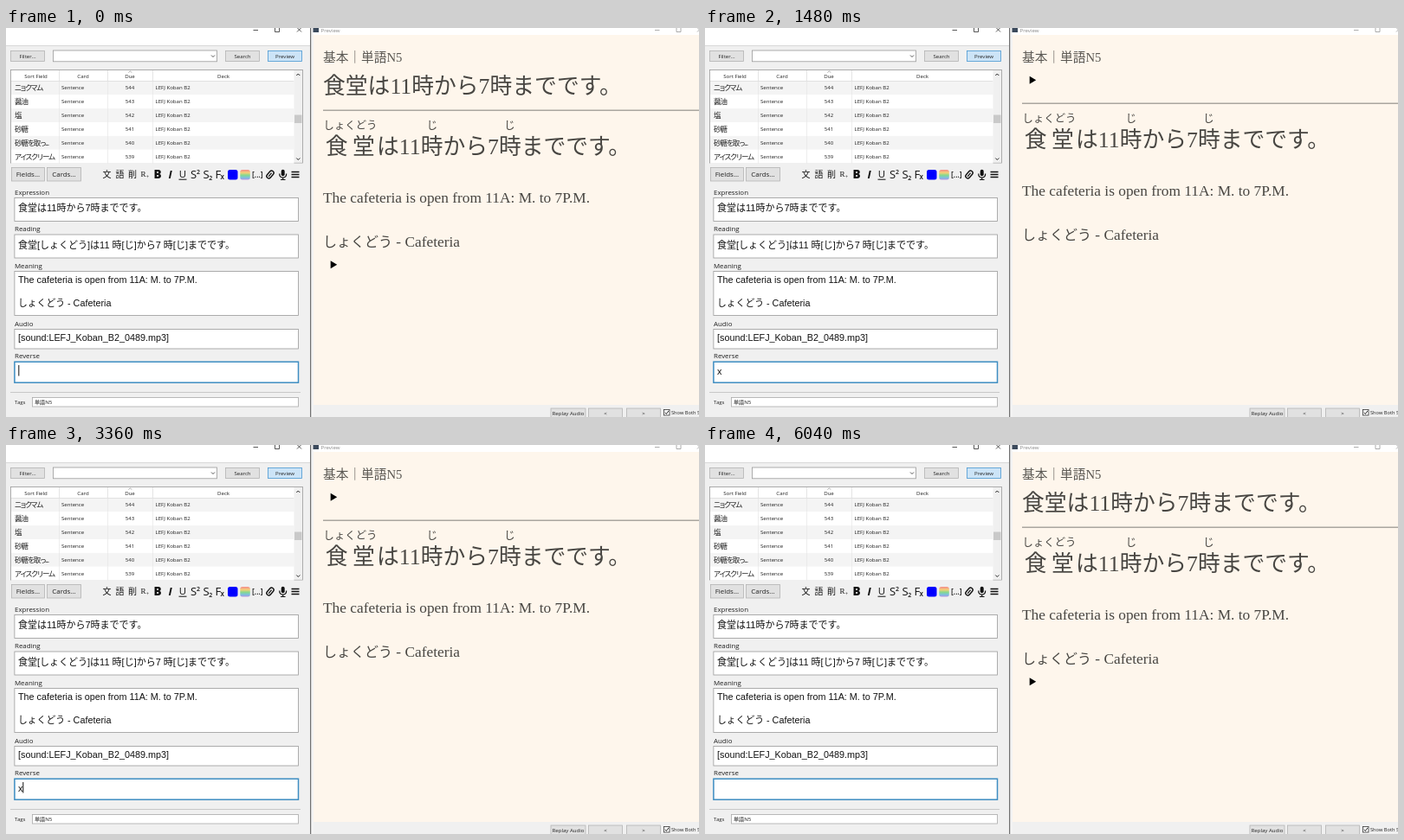
An HTML page for the animation above (6.08 s loop, 800x450 px).

```html
<!DOCTYPE html>
<html lang="ja">
<head>
<meta charset="utf-8">
<style>
  html, body { margin: 0; width: 100%; height: 100%; overflow: hidden; background: #f0f0f0; }
  svg { display: block; width: 800px; height: 450px; white-space: pre; }
  .ui { font: 6.1px "Open Sans", "Noto Sans CJK JP", "Noto Sans CJK", sans-serif; fill: #222; }
  .mid { text-anchor: middle; }
  .big { font-size: 7.9px; }
  .kana { font: 500 8.5px "Noto Sans CJK JP", "Noto Sans CJK", sans-serif; font-feature-settings: "palt"; letter-spacing: -1px; }
  .edit { font: 10.8px "Liberation Sans", "Noto Sans CJK JP", "Noto Sans CJK", sans-serif; fill: #111; }
  .edit .jp { font-size: 11px; }
  .tool { font: 10px "Noto Sans CJK JP", "Noto Sans CJK", sans-serif; text-anchor: middle; fill: #111; }
  .tool .lat { font-family: "Open Sans", sans-serif; font-size: 13px; font-weight: 600; }
  .card { font: 300 17.35px "Liberation Serif", "Noto Sans CJK JP", "Noto Sans CJK", serif; fill: #484642; }
  .head { font-size: 25.8px; }
  .ruby { font-size: 12.4px; }
  .line { fill: none; stroke: #111; }
  .btn { fill: #e1e1e1; stroke: #b4b4b4; stroke-width: .8; }
  .box { fill: #fff; stroke: #999; stroke-width: .8; }
</style>
</head>
<body>
<svg viewBox="0 0 800 450">
  <defs>
    <linearGradient id="rainbow" x2="0" y2="1">
      <stop stop-color="#f58a8a"/><stop offset=".3" stop-color="#f3cf78"/>
      <stop offset=".55" stop-color="#86d98c"/><stop offset=".8" stop-color="#7cbfe0"/>
      <stop offset="1" stop-color="#b493e0"/>
    </linearGradient>
  </defs>

  <!-- browser window -->
  <g class="ui">
    <rect width="352" height="450" fill="#f0f0f0"/>
    <rect width="352" height="20.5" fill="#fff"/>
    <path class="line" style="stroke:#d8d8d8" d="M0 20.5H351"/>
    <path class="line" stroke-width=".7" d="M285.5 2.500h5.500M310.500-.5h5v5h-5zM336-.5l5 5m0-5l-5 5"/>
    <g id="buttons"></g>
    <rect class="box" x="54.5" y="26" width="189" height="12.8"/>
    <path class="line" stroke-width=".7" d="M237 31.500l2 2l2-2"/>

    <rect class="box" x="5.5" y="48.5" width="337" height="107.5"/>
    <g id="rows"></g>
    <path class="line" style="stroke:#dedede" stroke-width=".8" d="M61.5 49V61M117.5 49V61M169.5 49V61M6 61.5H332.5"/>
    <path class="line" stroke-width=".6" style="stroke:#777" d="M141.3 51.5l2-1.500l2 1.500"/>
    <rect x="332.5" y="49" width="9.5" height="106.5" fill="#f0f0f0"/>
    <rect x="333" y="100.5" width="8.5" height="9.5" fill="#c9c9c9"/>
    <path class="line" stroke-width=".9" d="M335.3 55l2-2l2 2M335.3 150.5l2 2l2-2"/>
  </g>

  <!-- editor toolbar -->
  <g class="tool">
    <text x="116.5" y="173.2">文</text><text x="131.5" y="173.2">語</text><text x="146" y="173.2">削</text>
    <text x="158.5" y="172" style="font:9px 'Liberation Serif',serif">R</text>
    <text x="163.5" y="174" style="font:6px 'Liberation Serif',serif">+</text>
    <g class="lat">
      <text x="175" y="174.3" font-weight="800" style="font-size:13.5px">B</text>
      <text x="189.5" y="174.3" font-style="italic" font-weight="700">I</text>
      <text x="204" y="173" font-weight="400" style="font-size:11.5px">U</text>
      <text x="216.5" y="173.8" font-weight="400">S</text><text x="222" y="169" style="font-size:7px">2</text>
      <text x="231" y="173.8" font-weight="400">S</text><text x="236.3" y="175.5" style="font-size:7px">2</text>
      <text x="244.8" y="173.8" font-weight="400">F</text><text x="249.8" y="175" style="font-size:8px">x</text>
      <text x="290.3" y="172.6" style="font-size:8.5px">[...]</text>
    </g>
    <path class="line" d="M199.5 175.2h9"/>
    <rect x="256" y="164" width="11.5" height="11.5" rx="2.5" fill="#00f"/>
    <rect x="270.3" y="164" width="11.5" height="11.5" rx="2.5" fill="url(#rainbow)"/>
    <g transform="translate(305 169.5) rotate(40)">
      <rect class="line" x="-2.5" y="-5" width="5" height="10" rx="2.5" stroke-width="1.4"/>
      <path class="line" d="M0-2.5V3" stroke-width="1.2"/>
    </g>
    <rect x="317.7" y="163.8" width="4" height="7.5" rx="2"/>
    <path class="line" stroke-width="1.2" d="M315.7 168.5c0 6 8 6 8 0M319.7 173v2.500M317 175.5h5.500"/>
    <path class="line" stroke-width="1.3" d="M329.5 166.5h9M329.5 169.5h9M329.5 172.5h9"/>
  </g>

  <!-- note fields -->
  <g id="fields" class="ui"></g>
  <g class="edit">
    <text class="jp" x="14" y="212.3">食堂は11時から7時までです。</text>
    <text class="jp" x="14" y="254.8">食堂[しょくどう]は11 時[じ]から7 時[じ]までです。</text>
    <text x="14" y="295.3">The cafeteria is open from 11A: M. to 7P.M.</text>
    <text x="14" y="321.8">しょくどう - Cafeteria</text>
    <text x="14" y="362.3">[sound:LEFJ_Koban_B2_0489.mp3]</text>
    <text id="typed" x="14" y="401.3">x</text>
    <rect id="caret" y="390" width="1" height="12.5"/>
  </g>
  <path class="line" style="stroke:#c8c8c8" d="M5 421.5H340"/>
  <rect class="box" x="30.5" y="427.5" width="307" height="10.5" style="stroke:#aaa"/>
  <g class="ui"><text x="10" y="435">Tags</text><text x="33" y="435.2">単語N5</text></g>

  <!-- preview window -->
  <rect x="351" width="449" height="450" fill="#fff"/>
  <rect x="355" y="8" width="445" height="428" fill="#fef6ec"/>
  <rect x="355" y="436" width="445" height="14" fill="#f0f0f0"/>
  <rect x="351" width="1.5" height="450" fill="#707070"/>
  <rect x="352.5" width="2.5" height="450" fill="#f4f4f4"/>
  <rect x="354.5" width="6.5" height="5" fill="#3c4a5c"/>
  <g class="ui">
    <text x="363.5" y="4.5" style="fill:#888">Preview</text>
    <path class="line" style="stroke:#999" stroke-width=".8" d="M749 2.500h5.500M774-.5h5v5h-5zM798-.5l5 5m0-5l-5 5"/>
    <g id="footer"></g>
    <rect class="box" x="759.5" y="441.5" width="6.5" height="6.5" style="stroke:#333"/>
    <path class="line" stroke-width=".9" d="M760.8 444.8l1.500 1.700l2.700-3.700"/>
    <text x="768" y="447.3" style="font-size:5.7px">Show Both Sides</text>
  </g>

  <g class="card">
    <text x="366" y="39.3" style="font-size:14.7px;fill:#5a5752">基本｜単語N5</text>
    <text class="head" id="front" x="366" y="75.5">食堂は11時から7時までです。</text>
    <g id="back">
      <path class="line" style="stroke:#aaa69f" stroke-width="1.4" d="M366 95.3H800"/>
      <g class="ruby">
        <text x="366.5" y="116.5">しょくどう</text>
        <text class="mid" x="492" y="116.5">じ</text><text class="mid" x="581.5" y="116.5">じ</text>
      </g>
      <g class="head">
        <text x="368.7" y="145.5">食</text><text x="400" y="145.5">堂</text>
        <text x="428" y="145.5">は11時から7時までです。</text>
      </g>
      <text x="366" y="201.5">The cafeteria is open from 11A: M. to 7P.M.</text>
      <text x="366" y="252.5" style="font-size:16px">しょくどう<tspan style="font-size:17.35px"> - Cafeteria</tspan></text>
    </g>
    <path id="play" d="M374.7-4.500l7.500 4.500l-7.500 4.500z" fill="#000"/>
  </g>
</svg>
<script>
const $ = id => document.getElementById(id);
const text = (x, y, s, cls = "") => `<text class="${cls}" x="${x}" y="${y}">${s}</text>`;
const button = (x, y, w, h, s, cls = "", style = "") =>
  `<rect class="btn" style="${style}" x="${x}" y="${y}" width="${w}" height="${h}"/>` +
  text(x + w / 2, y + h / 2 + (cls ? 2.8 : 2.2), s, "mid " + cls);

$("buttons").innerHTML =
  button(5.5, 26.5, 39, 12, "Filter...") + button(253.5, 26.5, 39, 12, "Search") +
  button(302.5, 26.5, 39, 12, "Preview", "", "fill:#cce4f7;stroke:#4a98d3") +
  button(6.5, 161.5, 38, 15.5, "Fields...", "big") + button(47.5, 161.5, 39, 15.5, "Cards...", "big");
$("footer").innerHTML =
  button(629, 440, 40, 11, "Replay Audio") + button(672.5, 440, 39, 11, "&lt;") + button(716.5, 440, 39, 11, "&gt;");

const words = ["ニョクマム", "醤油", "塩", "砂糖", "砂糖を取っ...", "アイスクリーム"];
const headers = [[34.5, "Sort Field"], [89, "Card"], [143, "Due"], [251, "Deck"]];
$("rows").innerHTML = headers.map(([x, s]) => text(x, 57.7, s, "mid")).join("") +
  words.map((word, i) => {
    const y = 71.3 + 15.9 * i;
    return `<rect x="6" y="${y - 10}" width="326.5" height="15.9" fill="${i % 2 ? "#fff" : "#f4f4f4"}"/>` +
      text(10, y + .9, word, "kana") + text(64, y, "Sentence") +
      text(143, y, 544 - i, "mid") + text(172.5, y, "LEFJ Koban B2") +
      `<path class="line" style="stroke:#e2e2e2" stroke-width=".6" d="M61.5 ${y - 10}v15.9M117.5 ${y - 10}v15.9M169.5 ${y - 10}v15.9"/>`;
  }).join("");

const fields = [["Expression", 196.5, 27], ["Reading", 239, 27], ["Meaning", 281.5, 51], ["Audio", 348.5, 22.5], ["Reverse", 386.2, 24]];
$("fields").innerHTML = fields.map(([name, y, h]) => {
  const focus = name === "Reverse" ? "stroke:#3d8dc2;stroke-width:1.5" : "";
  return text(10, y - 3.9, name, "big") +
    `<rect class="box" style="${focus}" x="9.9" y="${y}" width="327.6" height="${h}"/>`;
}).join("");

const LOOP = 6080, BLINK = 530, TYPE = 800, ERASE = 4040, DELAY = 610;
const show = (el, on) => el.setAttribute("visibility", on ? "visible" : "hidden");

function draw(now) {
  const t = now % LOOP;
  const typed = t >= TYPE && t < ERASE;
  const hidden = t >= TYPE + DELAY && t < ERASE + DELAY;
  // each key press restarts the caret's blink
  const lastKey = t >= ERASE ? ERASE : t >= TYPE ? TYPE : 0;
  show($("typed"), typed);
  show($("caret"), Math.floor((t - lastKey) / BLINK) % 2 === 0);
  $("caret").setAttribute("x", typed ? 19.3 : 14.3);
  show($("front"), !hidden);
  $("back").setAttribute("transform", `translate(0 ${hidden ? -8 : 0})`);
  $("play").setAttribute("transform", `translate(0 ${hidden ? 60.3 : 273.8})`);
}

const start = performance.now();
function tick() {
  draw(performance.now() - start);
  requestAnimationFrame(tick);
}
tick();
</script>
</body>
</html>
```
